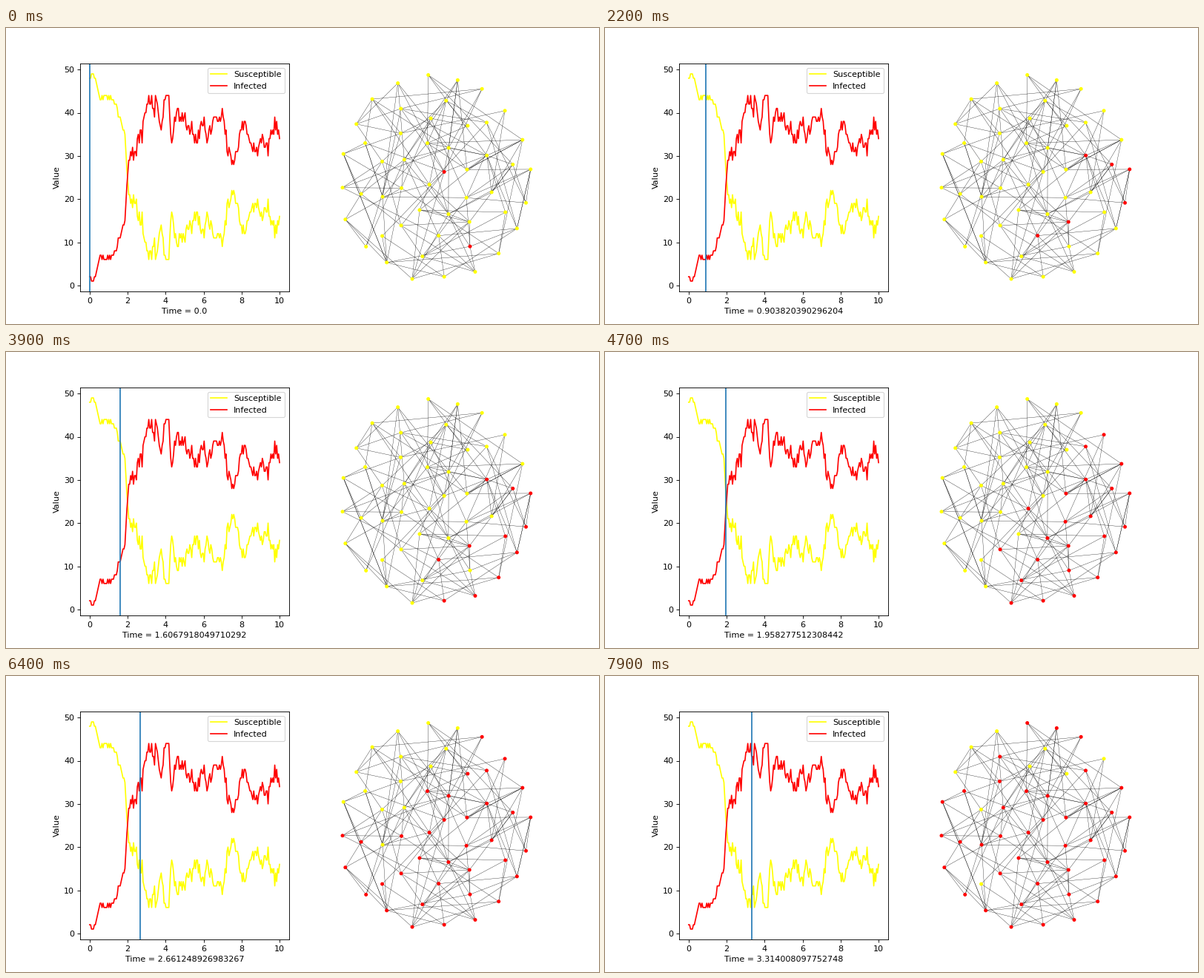
Recreate the animation shown at these times as a matplotlib script. Size 800 by 400 pixels, loop 8000 ms.

```python
import numpy as np
import matplotlib.pyplot as plt
from matplotlib.animation import FuncAnimation
from matplotlib.collections import LineCollection

FRAMES, INTERVAL = 80, 100
TIME_STEP = 0.050212243905344664
POPULATION = 50
CENTER = np.array([579.5, 202.5])
COLORS = np.array(["yellow", "red"])

# (count, radius, angle of the first node)
RINGS = [(2, 15, 45), (8, 46, 17), (10, 76, 20), (10, 102, 46), (20, 129, 77)]

# (time, infected) at the main turns of the epidemic
TURNS = [
    (0, 2), (0.1, 1), (0.3, 2), (0.55, 6.5), (1.2, 6.5), (1.5, 10), (1.85, 15),
    (2.08, 30), (2.4, 31), (2.75, 36), (3, 42), (3.5, 42), (3.75, 36), (4.1, 46),
    (4.3, 33), (4.6, 41), (5, 38), (5.6, 34), (6, 37), (6.25, 34), (6.5, 39),
    (7.1, 38), (7.3, 31), (7.65, 28), (8, 38), (8.75, 31), (9, 34), (9.4, 32),
    (9.6, 36), (10, 36),
]

rng = np.random.default_rng(7)


def layout():
    """Concentric rings of nodes, slightly shaken."""
    nodes = []
    for count, radius, start in RINGS:
        angle = np.radians(start + 360 * np.arange(count) / count)
        nodes.extend(np.c_[np.cos(angle), -1.06 * np.sin(angle)] * radius)
    return CENTER + nodes + rng.uniform(-4, 4, (POPULATION, 2))


def random_edges(nodes, links=3, neighbours=25):
    """Links from each node to a few of its nearer neighbours."""
    edges = []
    for node in nodes:
        near = np.argsort(np.hypot(*(nodes - node).T))[1:neighbours + 1]
        edges += [(node, nodes[other]) for other in rng.choice(near, links, replace=False)]
    return edges


def epidemic(times):
    """Infected count: the main turns plus noise that grows with the count."""
    trend = np.interp(times, *zip(*TURNS))
    noise = rng.normal(0, 1, len(times)) * trend / 30
    return np.clip(np.round(trend + noise), 1, POPULATION - 1).astype(int)


def spread(nodes, infected):
    """Node states that follow the count, starting from the lower right."""
    sick = np.zeros(POPULATION, int)
    for seed in [(591, 190), (626, 312)]:
        sick[np.argmin(np.hypot(*(nodes - seed).T))] = 1
    history = [sick.copy()]
    for target in infected[1:]:
        losses = max(sick.sum() - target, 0) + (rng.random() < 0.5)
        sick[rng.choice(np.flatnonzero(sick), losses, replace=False)] = 0
        exposure = nodes.sum(axis=1) + rng.normal(0, 60, POPULATION)
        exposure[sick == 1] = -np.inf
        sick[np.argsort(-exposure)[:target - sick.sum()]] = 1
        history.append(sick.copy())
    return history


times = np.arange(200) * TIME_STEP
nodes = layout()
edges = random_edges(nodes)
infected = epidemic(times)
states = spread(nodes, infected)

fig = plt.figure(figsize=(10, 5), dpi=80)
chart = fig.add_subplot(1, 2, 1)
chart.plot(times, POPULATION - infected, color="yellow", label="Susceptible")
chart.plot(times, infected, color="red", label="Infected")
chart.set_xlim(-0.05 * times[-1], 1.05 * times[-1])
chart.set_ylim(-1.4, 51.4)
chart.set_ylabel("Value")
chart.legend(loc="upper right")
marker = chart.axvline(0)

network = fig.add_axes([0, 0, 1, 1])
network.set(xlim=(0, 800), ylim=(400, 0))
network.axis("off")
network.add_collection(LineCollection(edges, colors="black", linewidths=0.3))
dots = network.scatter(*nodes.T, s=20, linewidths=0, zorder=3)


def update(frame):
    step = (5 * frame + 2) // 6
    time = float(times[step])
    marker.set_xdata([time, time])
    chart.set_xlabel(f"Time = {time}")
    dots.set_facecolor(COLORS[states[step]])
    return marker, dots


animation = FuncAnimation(fig, update, frames=FRAMES, interval=INTERVAL,
                          repeat=True, repeat_delay=0)
plt.show()
```
